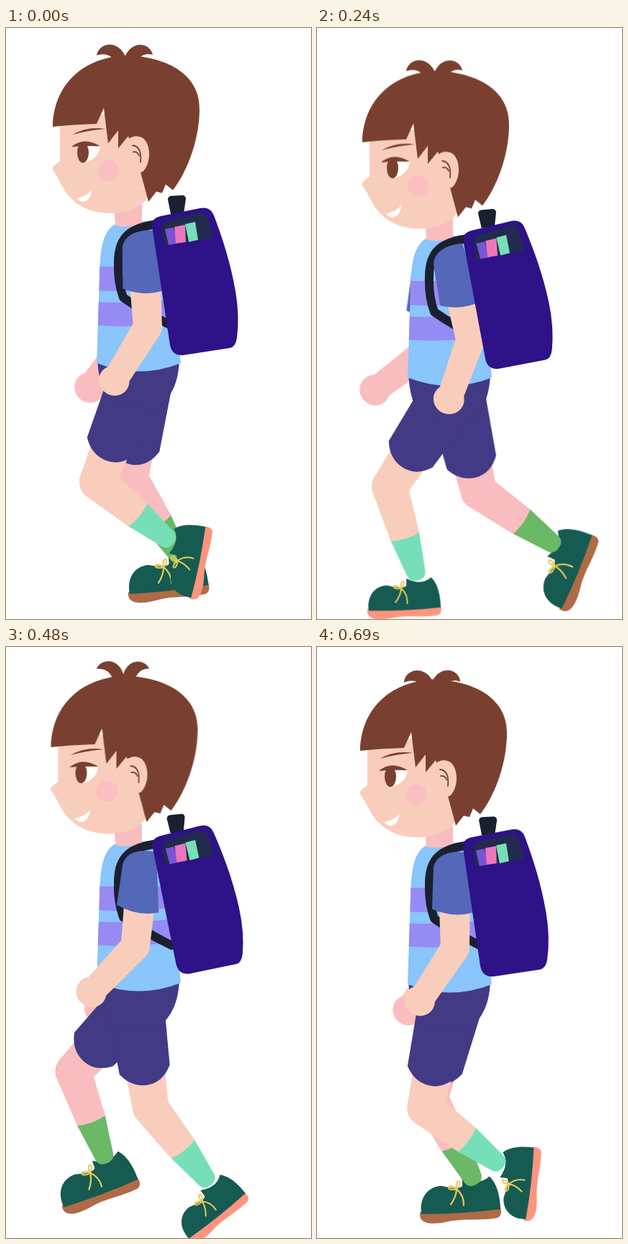
Animation of 424x820 px, one loop 720 ms. Source, as an HTML page without scripts:

```html
<!DOCTYPE html>
<html lang="en">
<head>
<meta charset="utf-8">
<title>Walking schoolboy</title>
<style>
@property --thigh { syntax: "<angle>"; inherits: true; initial-value: 0deg }
@property --shin { syntax: "<angle>"; inherits: true; initial-value: 0deg }
@property --foot { syntax: "<angle>"; inherits: true; initial-value: 0deg }
@property --upper { syntax: "<angle>"; inherits: true; initial-value: 0deg }
@property --fore { syntax: "<angle>"; inherits: true; initial-value: 0deg }
@property --tilt { syntax: "<angle>"; inherits: true; initial-value: 0deg }
@property --tuft { syntax: "<angle>"; inherits: true; initial-value: 0deg }

html, body { margin: 0; width: 100%; height: 100%; overflow: hidden; background: #fff }
svg { display: block; width: 424px; height: 820px }

.near { --skin: #f9cdbb; --sock: #76dfb7; --sole: #fe947d; --size: .91; --drop: 11px; --hem: 0px; --reach: 0deg }
.far { --skin: #f9bdbf; --sock: #6bb867; --sole: #b06a45; --size: 1; --drop: 5px; --hem: 12px; --reach: 11deg; animation-delay: -360ms !important }

.skin { fill: var(--skin) }
.sock { fill: var(--sock) }
.sole { fill: var(--sole) }
.hair { fill: #7a402f }
.shorts { fill: #423a85 }
.dark { fill: #1a2030 }
.stripe { fill: #968bf3 }
.line { fill: none; stroke-linecap: round; stroke-linejoin: round }

/* Joint angles are absolute; each child subtracts its parent's. */
.thigh { transform: rotate(var(--thigh)) }
.shin { transform: translateY(143px) rotate(calc(var(--shin) - var(--thigh))) }
.foot { transform: translateY(133px) rotate(calc(var(--foot) - var(--shin))) translate(5px, var(--drop)) scale(var(--size)) }
.hem { transform: translateY(var(--hem)) }
.upper { transform: rotate(var(--upper)) }
.fore { transform: translateY(110px) rotate(calc(var(--fore) - var(--upper) + var(--reach))) }
.bag { transform-origin: 215px 265px; transform: rotate(var(--tilt)) }
.tuft { transform-origin: 166px 42px }
.tuft.left { transform: rotate(var(--tuft)) }
.tuft.right { transform: rotate(calc(var(--tuft) * -1)) }

.body { animation: bob 360ms infinite }
.head { animation: nod 720ms infinite }
.leg { animation: stride 720ms infinite }
.arm { animation: swing 720ms infinite }

/* steps() holds every pose for 30 ms. */
@keyframes bob {
  0% { transform: translateY(0); --tilt: 0deg; animation-timing-function: steps(2) }
  16.666% { transform: translateY(-5px); --tilt: -1.6deg; animation-timing-function: steps(1) }
  25% { transform: translateY(-5px); --tilt: -2.4deg; animation-timing-function: steps(1) }
  33.333% { transform: translateY(1px); --tilt: -2.8deg; animation-timing-function: steps(2) }
  50% { transform: translateY(17px); --tilt: -3deg; animation-timing-function: steps(2) }
  66.666% { transform: translateY(20px); --tilt: -2deg; animation-timing-function: steps(2) }
  83.333% { transform: translateY(9px); --tilt: 0deg; animation-timing-function: steps(1) }
  91.666% { transform: translateY(3px); --tilt: .3deg; animation-timing-function: steps(1) }
  100% { transform: translateY(0); --tilt: 0deg }
}
@keyframes nod {
  0% { transform: translate(0, 0); --tuft: 0deg; animation-timing-function: steps(3) }
  12.5% { transform: translate(.5px, 1px); --tuft: 14deg; animation-timing-function: steps(3) }
  25% { transform: translate(-2px, 1px); --tuft: 11deg; animation-timing-function: steps(4) }
  41.666% { transform: translate(-2px, 2px); --tuft: -12deg; animation-timing-function: steps(2) }
  50% { transform: translate(-2px, 2px); --tuft: 0deg; animation-timing-function: steps(4) }
  66.666% { transform: translate(-2.5px, 1px); --tuft: 14deg; animation-timing-function: steps(4) }
  83.333% { transform: translate(-5px, 3px); --tuft: -7deg; animation-timing-function: steps(3) }
  95.833% { transform: translate(-5px, 4px); --tuft: -6deg; animation-timing-function: steps(1) }
  100% { transform: translate(0, 0); --tuft: 0deg }
}
@keyframes stride {
  0% { --thigh: 21.8deg; --shin: -51deg; --foot: -77deg; animation-timing-function: steps(3) }
  12.5% { --thigh: 41deg; --shin: -24.7deg; --foot: -42deg; animation-timing-function: steps(1) }
  16.666% { --thigh: 43.5deg; --shin: -20deg; --foot: -19deg; animation-timing-function: steps(2) }
  25% { --thigh: 34deg; --shin: 3.5deg; --foot: 14deg; animation-timing-function: steps(2) }
  33.333% { --thigh: 33.5deg; --shin: -17deg; --foot: -1deg; animation-timing-function: steps(2) }
  41.666% { --thigh: 20deg; --shin: -18.6deg; --foot: 0deg; animation-timing-function: steps(1) }
  45.833% { --thigh: 14deg; --shin: -28deg; --foot: -2deg; animation-timing-function: steps(1) }
  50% { --thigh: 7.7deg; --shin: -32.5deg; --foot: -5deg; animation-timing-function: steps(3) }
  62.5% { --thigh: -8deg; --shin: -38deg; --foot: -31deg; animation-timing-function: steps(1) }
  66.666% { --thigh: -8.5deg; --shin: -38deg; --foot: -37deg; animation-timing-function: steps(2) }
  75% { --thigh: -14.5deg; --shin: -56deg; --foot: -50deg; animation-timing-function: steps(2) }
  83.333% { --thigh: -13.3deg; --shin: -55deg; --foot: -66deg; animation-timing-function: steps(2) }
  91.666% { --thigh: 0deg; --shin: -60deg; --foot: -78deg; animation-timing-function: steps(1) }
  95.833% { --thigh: 12deg; --shin: -53deg; --foot: -82deg; animation-timing-function: steps(1) }
  100% { --thigh: 21.8deg; --shin: -51deg; --foot: -77deg }
}
@keyframes swing {
  0% { --upper: -3.6deg; --fore: 32deg; animation-timing-function: steps(3) }
  12.5% { --upper: -9deg; --fore: 25deg; animation-timing-function: steps(3) }
  25% { --upper: -12.5deg; --fore: 19.5deg; animation-timing-function: steps(4) }
  41.666% { --upper: -12deg; --fore: 20.5deg; animation-timing-function: steps(3) }
  54.166% { --upper: -2deg; --fore: 30deg; animation-timing-function: steps(3) }
  66.666% { --upper: 5.4deg; --fore: 44deg; animation-timing-function: steps(2) }
  75% { --upper: 7deg; --fore: 47deg; animation-timing-function: steps(2) }
  83.333% { --upper: 5deg; --fore: 42deg; animation-timing-function: steps(3) }
  95.833% { --upper: -1deg; --fore: 34deg; animation-timing-function: steps(1) }
  100% { --upper: -3.6deg; --fore: 32deg }
}
</style>
</head>
<body>
<svg viewBox="0 0 424 820">
  <defs>
    <g id="leg">
      <g class="thigh">
        <g class="shin">
          <g class="foot">
            <path class="sole" d="M-83 33L29 30Q32 42 24 45C0 48-20 44-40 47C-60 51-87 53-83 33Z"/>
            <path fill="#165b52" d="M-23-12Q0 0 15-13C25-4 29 15 29 33Q-25 38-81 36C-84 15-72-2-52-2C-40 1-28 4-23-1Z"/>
            <path class="line" stroke="#e8c85a" stroke-width="2.2" d="M-31 3C-44-8-48 6-31 3C-34-12-19-10-31 3Q-32 14-40 24M-31 3Q-21 12-22 26"/>
          </g>
          <path class="skin" d="M-25 0A25 25 0 0 1 25 0L20.5 76H-20.5Z"/>
          <path class="sock" d="M-20.5 73Q0 78 20.5 73L13 127Q11 136 0 136T-13 127Z"/>
        </g>
        <path class="skin" d="M-29 60H29L25 143A25 25 0 0 1-25 143Z"/>
        <path class="shorts hem" d="M-40 0Q0-45 40 0L35 88Q22 111 0 111T-36 91Z"/>
      </g>
    </g>
    <g id="arm">
      <g class="upper">
        <g class="fore skin">
          <path d="M-20 0A20 20 0 0 1 20 0L18 88H-17Z"/>
          <ellipse cy="88" rx="21.5" ry="20.5"/>
        </g>
        <path class="skin" d="M-21 50H22L20 110A20 20 0 0 1-20 110Z"/>
        <path fill="#5467b9" d="M-28-3C-24-20-5-26 17-23L28 60Q0 69-31 55Z"/>
      </g>
    </g>
    <clipPath id="torso"><path id="shirt" d="M150 273C133 285 131 310 130 345L126 465Q185 488 243 465L225 275Q185 262 150 273Z"/></clipPath>
  </defs>

  <g class="body">
    <use class="arm far" href="#arm" transform="translate(160 320)"/>
    <use class="leg far" href="#leg" transform="translate(192 484)"/>
    <use class="leg near" href="#leg" transform="translate(180 497)"/>
    <path class="shorts" d="M127 455H241C241 495 228 512 212 528L150 525C135 508 128 490 127 455Z"/>

    <use href="#shirt" fill="#8ac5fb"/>
    <g class="stripe" clip-path="url(#torso)">
      <path d="M120 331H250V358Q185 368 120 364Z"/>
      <path d="M120 380Q185 383 250 374V405Q185 418 120 412Z"/>
    </g>
    <path fill="#f9bdbf" d="M150 245H189V271Q170 278 152 274Z"/>

    <g class="head">
      <path fill="#f9cdbb" d="M75 120V185Q63 192 65 197C72 207 74 212 78 219C90 243 115 258 147 257C174 256 190 246 197 235L205 120Z"/>
      <path class="hair" d="M65 137C66 82 103 42 165 38C220 39 271 62 269 115C268 160 250 202 232 225L222 217L217 229L209 227L198 241L187 200L170 150L156 167L156 142L142 160L136 111L126 133Q90 134 65 137Z"/>
      <path class="hair tuft left" d="M126 38C129 20 157 15 167 42L152 48C148 38 138 34 126 38Z"/>
      <path class="hair tuft right" d="M164 44C172 16 200 19 204 37C193 34 186 39 180 48Z"/>
      <path fill="#f9cdbb" d="M166 160C172 149 182 149 189 152C200 158 203 182 193 196Q190 201 186 200L165 190Z"/>
      <path class="line" stroke="#7a402f" stroke-width="1.8" d="M176 163Q189 164 187 186M177 172Q183 171 185 177"/>
      <circle cx="143" cy="198" r="14.5" fill="#fbbec1"/>
      <path fill="#fff" d="M100 161Q116 158 131 164Q129 181 110 187ZM98 236Q111 234 120 224Q117 241 106 241Q101 240 98 236Z"/>
      <ellipse class="hair" cx="107" cy="173" rx="8" ry="14"/>
      <path class="hair" d="M91 165Q108 150 131 164Q110 163 91 165ZM92 148Q113 136 138 140Q114 142 92 148Z"/>
    </g>

    <path class="line" stroke="#1a2030" stroke-width="12" d="M210 272C175 277 156 288 156 325Q155 352 163 374Q190 393 230 413"/>
    <use class="arm near" href="#arm" transform="translate(190 305)"/>

    <g class="bag">
      <path class="dark" d="M225 238Q225 234 229 233L246 232Q250 233 250 237L247 258H229Z"/>
      <path fill="#2e1287" d="M203 275Q202 264 215 261L270 250Q284 247 289 260C301 292 312 325 319 365Q325 400 321 430Q319 443 311 444L246 454Q231 455 228 440Z"/>
      <path fill="#222b4d" d="M217 279Q217 270 227 267L266 257Q277 255 281 265L288 291L220 301Z"/>
      <path fill="#7a54d8" d="M221 279L233 277L238 299L226 301Z"/>
      <path fill="#ec76bc" d="M234 276L249 273L250 297L236 299Z"/>
      <path fill="#76dfb7" d="M249 272L263 269L267 294L254 297Z"/>
    </g>
  </g>
</svg>
</body>
</html>
```
